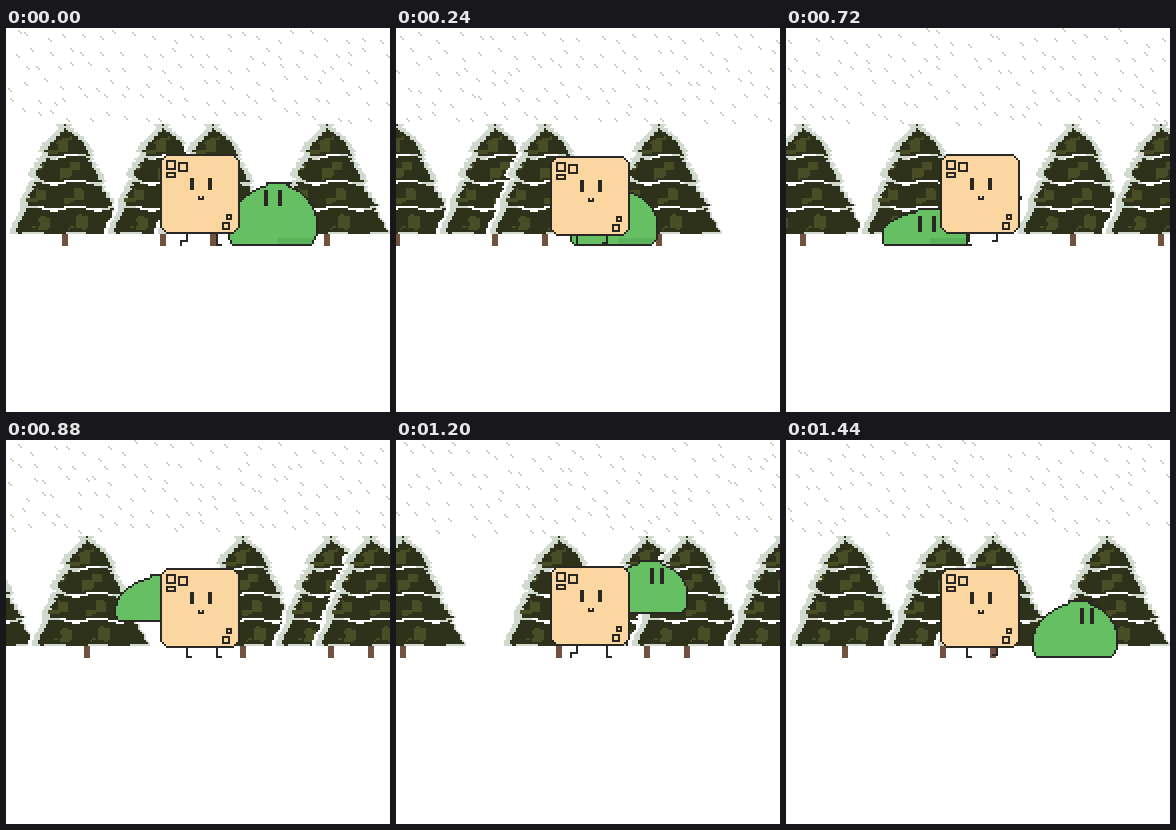
Write an HTML page with a canvas that moves like this. It is 384 px wide and 384 px high and loops after 1.52 s.

```html
<!DOCTYPE html>
<html lang="en">
<head>
<meta charset="utf-8">
<title>Winter walk</title>
<style>
html, body { margin: 0; width: 100%; height: 100%; overflow: hidden; background: #fff; }
canvas { display: block; width: 384px; height: 384px; image-rendering: pixelated; }
</style>
</head>
<body>
<canvas id="stage" width="384" height="384"></canvas>
<script>
const stage = document.getElementById('stage').getContext('2d');
let ctx = stage;
const STEP = 80, STEPS = 19;
const INK = '#292724', BISCUIT = '#fcd6a1', GREEN = '#66bf63', SHADE = '#5ab35a';
const DARK = '#2e321b', OLIVE = '#494d26', FROST = '#d0d9cd', BARK = '#72513f', FLAKE = '#d3cec8';

const snap = v => 2 * Math.round(v / 2);
const noise = n => { const s = Math.sin(n * 12.9898) * 43758.5453; return s - Math.floor(s); };

function box(x, y, w, h, color) {
  ctx.fillStyle = color;
  ctx.fillRect(snap(x), snap(y), snap(w), snap(h));
}

// Values are keyed every third step.
function lerpKeys(keys, step) {
  const i = Math.min(Math.floor(step / 3), keys.length - 2);
  return keys[i] + (keys[i + 1] - keys[i]) * (step / 3 - i);
}

function smoothKeys(keys, step) {
  const i = Math.min(Math.floor(step / 3), keys.length - 2), u = step / 3 - i;
  const b = keys[i], c = keys[i + 1];
  const a = i ? keys[i - 1] : 2 * b - c;
  const d = i + 2 < keys.length ? keys[i + 2] : 2 * c - b;
  return b + u / 2 * (c - a + u * (2 * a - 5 * b + 4 * c - d + u * (3 * (b - c) + d - a)));
}

// Colour of one cell of a tree with its trunk at x = 0.
function needle(x, y) {
  const wavy = (y - 100 + 2 * Math.sin(x / 7)) / 26;
  const tier = Math.max(0, Math.min(3, Math.floor(wavy))), t = wavy - tier;
  const tip = Math.min(1, Math.max(0, (y - 96) / 16));
  const side = x < 0 ? 22 + 10 * tier : 25 + 12 * tier;
  const round = x < 0 ? 30 * Math.max(0, t - 0.8) : 0;
  const reach = (side - 15 * (1 - t) - round) * tip + 3 * (noise(y + tier) - 0.5);
  const over = Math.abs(x) - reach;
  const rim = x < 0 ? 7 : 6 - 1.5 * tier;
  if (y < 96 || over > rim + 4) return null;
  if (over > rim) return x < 0 ? '#fff' : null;
  if (over > 0) return FROST;
  if (t > 1) return FROST;
  if (tier && t < 0.09) return over > -10 ? FROST : '#fff';
  const lit = Math.sin(x / 6 + y / 8 + tier * 2) + 0.5 * Math.sin(x / 3 - y / 4);
  return t > 0.35 && t < 0.9 && lit > 0.45 && x < reach * 0.5 ? OLIVE : DARK;
}

function makeTree() {
  const sprite = document.createElement('canvas');
  sprite.width = 144;
  sprite.height = 220;
  ctx = sprite.getContext('2d');
  ctx.translate(72, 0);
  box(-2, 204, 6, 14, BARK);
  for (let y = 96; y < 206; y += 2) {
    for (let x = -70; x < 70; x += 2) {
      const color = needle(x, y);
      if (color) box(x, y, 2, 2, color);
    }
  }
  ctx = stage;
  return sprite;
}

const tree = makeTree();
const homes = [59, 157, 207, 321, 477, 565, 605, 701];
const scroll = [0, 58, 136, 190, 266, 314, 400];

function forest(step) {
  const shift = lerpKeys(scroll, step % (STEPS - 1));
  homes.map(x => x - shift).filter(x => x < 410).forEach(x => ctx.drawImage(tree, snap(x - 1) - 72, 0));
}

function snow(step) {
  const shift = step * 64 / 3;
  for (let i = 0; i < 132; i++) {
    const col = i % 22, row = Math.floor(i / 22);
    const x = (col * 17.45 + row * 5 + noise(i + 1) * 12 + shift) % 384;
    const y = (row * 16 + noise(i + 300) * 12 + shift) % 94;
    box(x, y, 2, 2, FLAKE);
    box(snap(x) + 2, snap(y) + 2, 2, 2, FLAKE);
  }
}

const slimeX = [266, 217, 168, 139, 166, 249, 288];
const slimeHeight = [62, 57, 51, 36, 51, 53, 57];

function slime(step) {
  const x = smoothKeys(slimeX, step), h = smoothKeys(slimeHeight, step);
  const hop = 50 * Math.max(0, 1 - ((step - 13.4) / 4.4) ** 2);
  const air = step > 9, half = air ? 42 : 44;
  const base = snap(216 - hop), top = snap(base - h), peak = x + 5;
  // Half width above and below the widest row.
  const edge = (y, far, belly) => {
    const k = y < belly ? (belly - y) / (belly - top) : (y - belly) / (base - belly);
    return y < belly ? far * Math.pow(1 - k ** 1.8, 0.6) : far - 7 * k ** 4;
  };
  const span = y => {
    const l = edge(y, peak - x + half, base - h * 0.3), r = edge(y, half + x - peak, base - h * 0.36);
    return [snap(peak - l), snap(peak + r)];
  };
  let [pl, pr] = [snap(peak - 12), snap(peak + 12)];
  const mid = snap(peak);
  for (let y = top; y <= base; y += 2) {
    const [l, r] = y === top ? [pl, pr] : span(y);
    const last = y === base;
    box(l, y, r - l + 2, 2, last || y === top ? INK : GREEN);
    if (!air && !last && y > base - 8) box(mid, y, r - mid, 2, SHADE);
    box(Math.min(l, pl), y, Math.max(2, Math.abs(pl - l)), 2, INK);
    box(Math.min(r, pr + 2), y, Math.max(2, r - pr), 2, INK);
    if (r <= pr) box(r, y, Math.max(2, pr - r), 2, INK);
    [pl, pr] = [l, r];
  }
  const eye = air ? x + 5 : x - 8, gap = air ? 10 : 14;
  box(eye, top + 8, 4, 15, INK);
  box(eye + gap, top + 8, 4, 15, INK);
}

const bob = [126, 128, 132, 128, 126];

function leg(x, y, lifted, footSide) {
  const end = lifted ? y + 8 : 216;
  box(x, y, 2, end - y, INK);
  box(lifted ? x - 4 : x, end, 6, 2, INK);
  if (lifted && footSide) box(x - 6, end, 2, 6, INK);
}

function crumb(x, y, w, h) {
  box(x, y, w, h, INK);
  box(x + 2, y + 2, w - 4, h - 4, BISCUIT);
}

function biscuit(step) {
  const phase = step % 5, y = bob[phase];
  leg(180, y + 78, phase === 0, true);
  leg(210, y + 78, phase > 2, false);
  if (phase === 4) box(234, y + 42, 2, 4, INK);
  for (let k = 0; k <= 6; k += 2) box(160 - k, y + k, 68 + 2 * k, 80 - 2 * k, INK);
  for (let k = 2; k <= 6; k += 2) box(162 - k, y + k, 64 + 2 * k, 80 - 2 * k, BISCUIT);
  crumb(160, y + 6, 10, 10);
  crumb(160, y + 18, 10, 6);
  crumb(172, y + 8, 10, 10);
  crumb(220, y + 60, 6, 6);
  crumb(216, y + 68, 8, 8);
  [184, 202].forEach(x => box(x, y + 24, 4, 12, INK));
  [192, 196].forEach(x => box(x, y + 42, 2, 2, INK));
  box(192, y + 44, 6, 2, INK);
}

function draw(now) {
  const step = Math.floor(now / STEP) % STEPS;
  box(0, 0, 384, 384, '#fff');
  snow(step);
  forest(step);
  slime(step);
  biscuit(step);
}

const start = performance.now();
function tick() {
  draw(performance.now() - start);
  requestAnimationFrame(tick);
}
tick();
</script>
</body>
</html>
```
